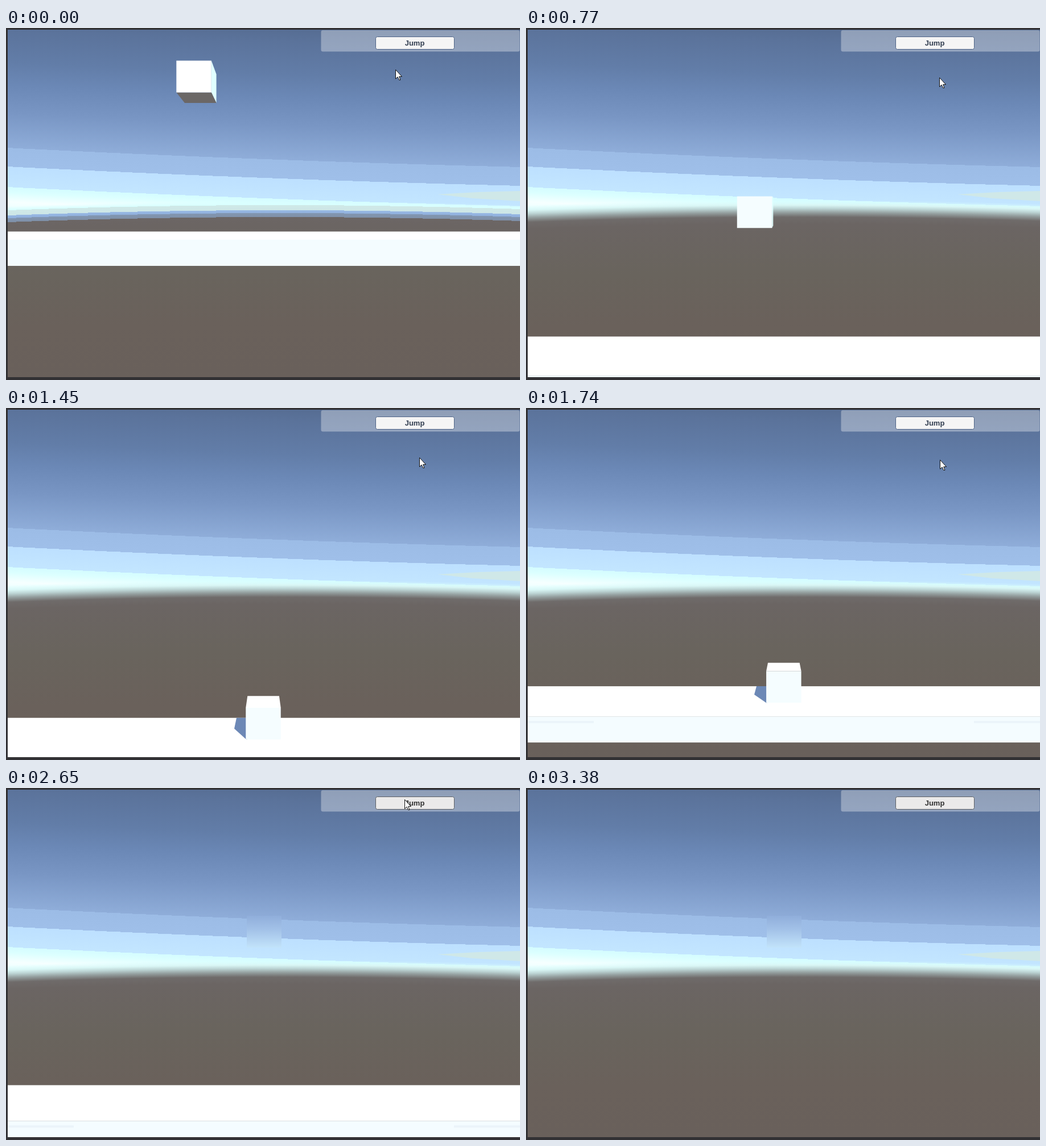
Animation, 903 px wide and 620 px high, one loop 3800 ms. Source, as an HTML page with a canvas:

```html
<!DOCTYPE html>
<html lang="en">
<head>
<meta charset="utf-8">
<style>
  html, body { margin: 0; width: 100%; height: 100%; overflow: hidden; background: #323134; }
  canvas { display: block; }
</style>
</head>
<body>
<canvas id="stage" width="903" height="620"></canvas>
<script>
const W = 903, H = 620, LOOP = 3800;
const ctx = document.getElementById('stage').getContext('2d');

// Scene units: one cube edge. Depths are distances from the camera.
const CUBE_NEAR = 9.5, CUBE_FAR = 10.5, SLAB_NEAR = 8.53, SLAB_FAR = 11.03;
const SLAB_HEIGHT = 0.74, REST = 3.464, DROP = 4.54;
const project = (x, y, z) => [453 + x * 584 / z, 309 + y * 530 / z];

function poly(c, color, points) {
  c.fillStyle = color;
  c.beginPath();
  points.forEach(p => c.lineTo(p[0], p[1]));
  c.fill();
}

function ramp(c, stops) {
  const y0 = stops[0][0], y1 = stops[stops.length - 1][0];
  const g = c.createLinearGradient(0, y0, 0, y1);
  stops.forEach(([y, color]) => g.addColorStop((y - y0) / (y1 - y0), color));
  return g;
}

function makeBackdrop(banded) {
  const canvas = document.createElement('canvas');
  canvas.width = W;
  canvas.height = H;
  const c = canvas.getContext('2d');
  const sky = ramp(c, [
    [-40, '#52688c'], [3, '#5b739b'], [60, '#627dA8'], [100, '#6b88b6'], [150, '#7996c4'],
    [211, '#8fadd9'], [211, '#9cbce6'], [244, '#9fbfe9'], [244, '#bde0ff'], [280, '#c3e6ff'],
    [280, '#d4fcff'], [290, '#dcffff'], [306, '#f6ffff'], [340, '#dcffff']]);
  const ground = [[345, '#6b6563'], [430, '#69645d'], [520, '#6a615b'], [615, '#69605b']];
  const horizon = ramp(c, banded
    ? [[305, '#d8ffff00'], [312, '#d8ffff'], [312, '#cfe9e8'], [321, '#cde6e6'], [321, '#98b9e4'],
       [326, '#90b0dc'], [326, '#8297b2'], [333, '#7f90a8'], [333, '#6c6665'], ...ground]
    : [[303, '#d8ffff00'], [312, '#d9f6f5'], [318, '#bcd4d4'], [325, '#949f9f'],
       [333, '#6f6b6a'], ...ground]);
  for (let x = 0; x < W; x += 3) {
    const p = x / W;
    c.setTransform(1, 0, 0, 1, x, 34 * (1.35 * p - 0.35 * p * p));
    c.fillStyle = sky;
    c.fillRect(0, -40, 3, 400);
    c.setTransform(1, 0, 0, 1, x, 8 * ((x - 480) / 450) ** 2);
    c.fillStyle = horizon;
    c.fillRect(0, 303, 3, 320);
  }
  c.resetTransform();
  poly(c, '#cfe8e8', [[758, 293], [830, 289], [903, 287], [903, 305], [820, 300]]);
  return canvas;
}

const bandedSky = makeBackdrop(true), smoothSky = makeBackdrop(false);

// lag: cube below its resting place on screen; gap: cube above the slab;
// dx: distance left of centre in pixels; depth: slab top below the camera.
function pose(t) {
  if (t < 590) return { lag: -6.97, dx: 123, depth: 1.03, cube: true };
  if (t < 770) return { lag: -6.77, dx: 119, depth: 1.24, cube: true };
  const s = (t - 770) / 1000;
  const dx = 51.5 * Math.exp(-5.8 * s);
  const gap = Math.max(0, DROP - (0.435 + 2.92 * s + 4.905 * s * s));
  const lag = gap > 0.01
    ? 1.423 + 0.4 * s - 4.113 * Math.exp(-5.8 * s)
    : 1.6 * Math.exp(-5.6 * (t - 1434) / 1000);
  if (t < 2600) return { lag, dx, depth: REST + lag + gap, cube: true };
  const rise = 330 * ((t - 2595) / 1000) ** 2;
  return { lag: -3.966, dx: 0, depth: REST + rise, cube: t < 2640 };
}

function drawSlab(depth) {
  const back = project(0, depth, SLAB_FAR)[1];
  const edge = project(0, depth, SLAB_NEAR)[1];
  const foot = project(0, depth + SLAB_HEIGHT, SLAB_NEAR)[1];
  ctx.fillStyle = '#ffffff';
  ctx.fillRect(3, back, 900, edge - back);
  ctx.fillStyle = '#f4fcff';
  ctx.fillRect(3, edge, 900, foot - edge);
  if (depth > 3) {
    ctx.fillStyle = '#ebf4fa';
    ctx.fillRect(3, edge + 8, 116, 4);
    ctx.fillRect(787, edge + 8, 116, 4);
  }
}

function drawShadow(depth, gap) {
  const back = project(0, depth, SLAB_FAR)[1];
  const near = project(0, depth, CUBE_NEAR)[1];
  const x = 422 - gap * 40;
  poly(ctx, '#6c88b6', [[x - 17, back], [x + 2, back], [x + 2, near], [x, near], [x - 21, (back + near) / 2]]);
}

function drawCube(dx, bottom, front) {
  const mid = -dx / 61.5, l = mid - 0.5, r = mid + 0.5, top = bottom - 1;
  const n = (x, y) => project(x, y, CUBE_NEAR), f = (x, y) => project(x, y, CUBE_FAR);
  if (r < 0) poly(ctx, '#e0ffff', [n(r, top), f(r, top), f(r, bottom), n(r, bottom)]);
  if (bottom < 0) poly(ctx, '#6b6766', [n(l, bottom), n(r, bottom), f(r, bottom), f(l, bottom)]);
  if (top > 0) poly(ctx, '#ffffff', [n(l, top), n(r, top), f(r, top), f(l, top)]);
  poly(ctx, front, [n(l, top), n(r, top), n(r, bottom), n(l, bottom)]);
}

function drawPanel(t) {
  ctx.fillStyle = 'rgba(255,255,255,.34)';
  ctx.beginPath();
  ctx.roundRect(553.5, 4, 349, 37.5, 3);
  ctx.fill();
  const pressed = t >= 2450 && t < 2590, hovered = t >= 2170;
  ctx.fillStyle = pressed ? '#c8c8c8' : hovered ? '#ebeaea' : '#f5f5f5';
  ctx.strokeStyle = hovered ? '#5d6065' : '#4f6486';
  ctx.lineWidth = 1;
  ctx.beginPath();
  ctx.roundRect(649.5, 15.5, 138, 22, 3);
  ctx.fill();
  ctx.stroke();
  ctx.fillStyle = hovered ? '#323232' : '#323e50';
  ctx.font = 'bold 13px "Liberation Sans", Arial, sans-serif';
  ctx.textAlign = 'center';
  ctx.fillText('Jump', 718, 31);
}

const cursorPath = [
  [0, 684, 73], [300, 767, 108], [550, 726, 87], [1400, 726, 87], [1700, 727, 91],
  [1890, 727, 91], [2250, 700, 16], [2450, 700, 16], [2640, 700, 20], [2860, 700, 20],
  [3380, 742, 620], [LOOP, 742, 620]];

function drawCursor(t) {
  const i = cursorPath.findIndex(k => k[0] > t);
  const [t0, x0, y0] = cursorPath[i - 1], [t1, x1, y1] = cursorPath[i];
  const p = (t - t0) / (t1 - t0), e = p * p * (3 - 2 * p);
  ctx.save();
  ctx.translate(Math.round(x0 + (x1 - x0) * e) + 0.5, Math.round(y0 + (y1 - y0) * e) + 0.5);
  const arrow = new Path2D('M0 0V16L3.6 12.6L6 18H8.4L6.2 12H11Z');
  ctx.fillStyle = '#fff';
  ctx.strokeStyle = '#111';
  ctx.lineWidth = 1;
  ctx.fill(arrow);
  ctx.stroke(arrow);
  ctx.restore();
}

const clearedSky = ramp(ctx, [[225, '#90aedb'], [250, '#a3c2e8'], [281, '#c2e3fa']]);

function draw(time) {
  const t = time % LOOP;
  const step = t < 770 ? t : Math.floor((t - 10) / 40) * 40 + 10;
  const { lag, dx, depth, cube } = pose(step);
  const bottom = REST + lag;
  ctx.fillStyle = '#323134';
  ctx.fillRect(0, 0, W, H);
  ctx.save();
  ctx.beginPath();
  ctx.rect(3, 3, 900, 612);
  ctx.clip();
  ctx.drawImage(t < 590 ? bandedSky : smoothSky, 0, 0);
  if (step > 2640) {
    ctx.fillStyle = clearedSky;
    ctx.fillRect(423, 225, 61, 56);
  }
  drawSlab(depth);
  if (cube && depth - bottom < 1) drawShadow(depth, depth - bottom);
  if (cube) drawCube(dx, bottom, t < 770 ? '#ffffff' : '#f5fdff');
  ctx.restore();
  drawPanel(t);
  drawCursor(t);
}

const start = performance.now();
function tick() {
  draw(performance.now() - start);
  requestAnimationFrame(tick);
}
tick();
</script>
</body>
</html>
```
